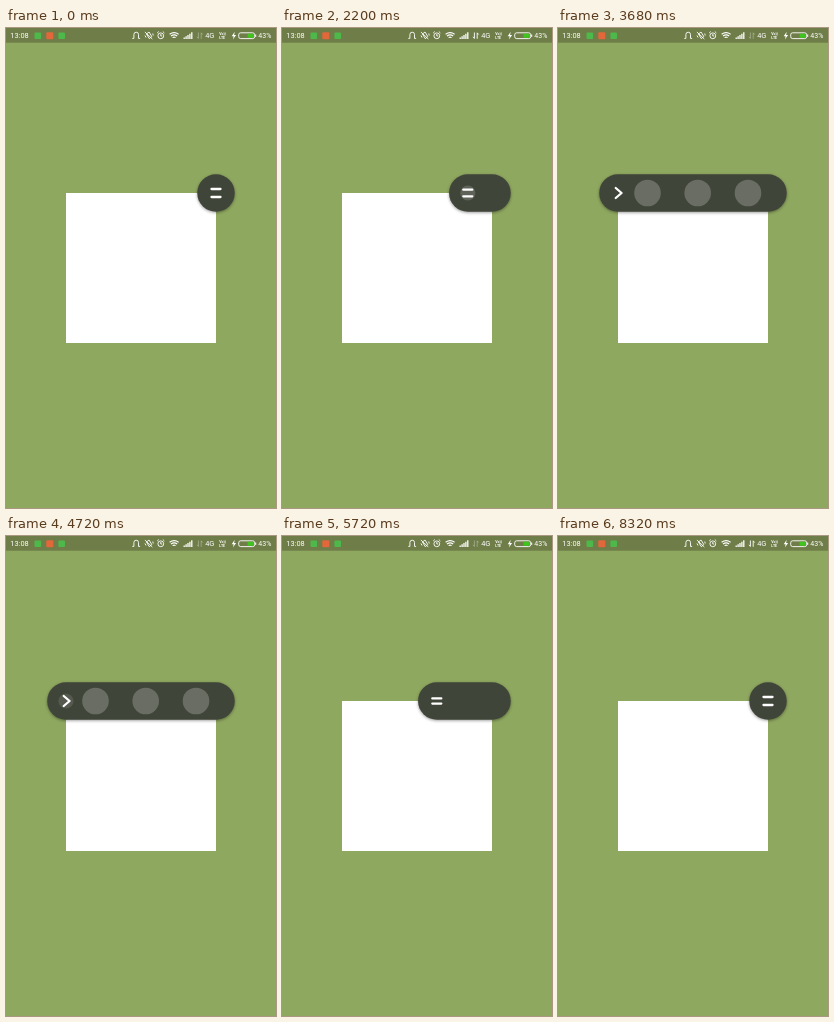
Animation of 270 by 480 pixels, one loop 8.36 s. Source, as an HTML page:

```html
<!DOCTYPE html>
<html lang="en">
<head>
<meta charset="utf-8">
<title>Expanding menu</title>
<style>
  html, body { margin: 0; width: 100%; height: 100%; overflow: hidden; background: #8fa860; }
  svg { display: block; width: 100%; height: 100%; }
  text { font-family: Roboto, sans-serif; fill: #fff; }
  .line { fill: none; stroke: #fff; stroke-width: .9; }
  #bar { fill: #404539; filter: drop-shadow(.6px 1.5px 1.5px rgba(0, 0, 0, .38)); }
  #icon path { fill: none; stroke: #fff; stroke-width: 2.3; stroke-linecap: round; stroke-linejoin: round; }
</style>
</head>
<body>
<svg viewBox="0 0 270 480">
  <rect width="270" height="480" fill="#8fa860"/>
  <rect width="270" height="14.7" fill="#6f7d48"/>

  <g id="status" font-size="7.4">
    <text x="4.3" y="10.3">13:08</text>
    <rect x="28.5" y="4.5" width="6.6" height="6.6" rx="1" fill="#4cb94a"/>
    <rect x="40.3" y="4.2" width="7" height="7" rx="1" fill="#e2673a"/>
    <rect x="52.4" y="4.5" width="6.6" height="6.6" rx="1" fill="#4cb94a"/>
    <g class="line">
      <path d="M126.3 10.4h1.6V6.5a2.3 2.3 0 0 1 4.6 0v3.9h1.6"/>
      <path d="M140.5 6l2.5-2 2.8 4.5-2.5 2.2zM138.9 4l7.4 7M139 7.5l1 2M146.8 5.5l.4 2"/>
      <circle cx="154.8" cy="7.8" r="2.9"/>
      <path d="M154.8 6v2h1.4M151.2 5l1.6-1.5M158.4 5l-1.6-1.5"/>
      <path d="M163.6 6.2q4.5-3.2 9 0M165 8q3.1-2.2 6.2 0M166.6 9.6q1.5-1 3 0" stroke-width="1.1"/>
      <path d="M178.2 11V9.4M180.1 11V8.2M182 11V7M183.9 11V5.7M185.8 11V4.3" stroke-width="1.3"/>
      <path id="arrows" d="M192.4 4.5v5.9M191 8.8l1.4 1.7M195.2 10.8V4.9M195.2 4.8l1.4 1.7"/>
    </g>
    <text x="199.2" y="10.3">4G</text>
    <g font-size="3.6" font-weight="700">
      <text x="213.3" y="7.1">Vo))</text>
      <text x="213.3" y="10.9">LTE</text>
    </g>
    <path d="M228.7 3.8l-3 4.4h2l-.8 3.3 3.2-4.5h-2z" fill="#fff"/>
    <rect x="232.7" y="4.8" width="16" height="5.8" rx="2" class="line"/>
    <path d="M241.6 5.7h5.2q1 0 1 1v2q0 1-1 1h-5.2z" fill="#3fc51d"/>
    <rect x="249.2" y="6.5" width="1" height="2.4" fill="#fff"/>
    <text x="252.3" y="10.3" font-size="7">43%</text>
  </g>

  <rect x="60" y="165" width="150" height="150" fill="#fff"/>
  <rect id="bar" y="146.3" height="37.5" rx="18.75"/>
  <g id="dots" fill="#fff">
    <circle cx="89.5" cy="165"/><circle cx="139.7" cy="165"/><circle cx="190" cy="165"/>
  </g>
  <g id="icon">
    <circle id="ripple" fill="#fff"/>
    <path id="glyph"/>
  </g>
</svg>
<script>
const LOOP = 8360, RIGHT = 228.75, OPEN_LEFT = 41.2, CLOSED_LEFT = 191.25;
const $ = id => document.getElementById(id);
const dots = [...$('dots').children];
const set = (el, attrs) => { for (const k in attrs) el.setAttribute(k, attrs[k]); };
const mix = (a, b, k) => a + (b - a) * k;
const ramp = (t, start, length) => Math.min(1, Math.max(0, (t - start) / length));
const smooth = k => (1 - Math.cos(Math.PI * k)) / 2;
const decelerate = k => 1 - (1 - k) ** 2;

// Intervals with mobile data traffic
const traffic = [[880, 1240], [1600, 2400], [4080, 4440], [5800, 6300], [6700, 7100], [7640, LOOP]];

function press(t, start) {
  return ramp(t, start, 100) * (1 - ramp(t, start + 260, 260));
}

function draw(t) {
  const open = smooth(ramp(t, 2080, 460)) - decelerate(ramp(t, 5540, 460));
  const reveal = smooth(ramp(t, 2545, 440)) - smooth(ramp(t, 5060, 460));
  const left = mix(CLOSED_LEFT, OPEN_LEFT, open);

  set($('bar'), { x: left, width: RIGHT - left });
  for (const dot of dots) set(dot, { r: 13.3 * reveal, opacity: .22 * reveal });

  // Two lines merge into a dash, then bend into a chevron
  const gap = 4 * (1 - open);
  const x1 = mix(-4.5, -2.2, reveal), x2 = mix(4.5, 3.6, reveal), rise = gap + 5 * reveal;
  set($('icon'), { transform: `translate(${left + 18.75} 165)` });
  set($('glyph'), { d: `M${x1} ${-rise}L${x2} ${-gap}M${x1} ${rise}L${x2} ${gap}` });

  const touch = Math.max(press(t, 1790), press(t, 4692));
  set($('ripple'), { r: touch ? 7.6 : 0, opacity: .38 * touch });
  set($('arrows'), { opacity: traffic.some(([a, b]) => t >= a && t < b) ? 1 : .35 });
}

function tick() {
  draw(performance.now() % LOOP);
  requestAnimationFrame(tick);
}
tick();
</script>
</body>
</html>
```
